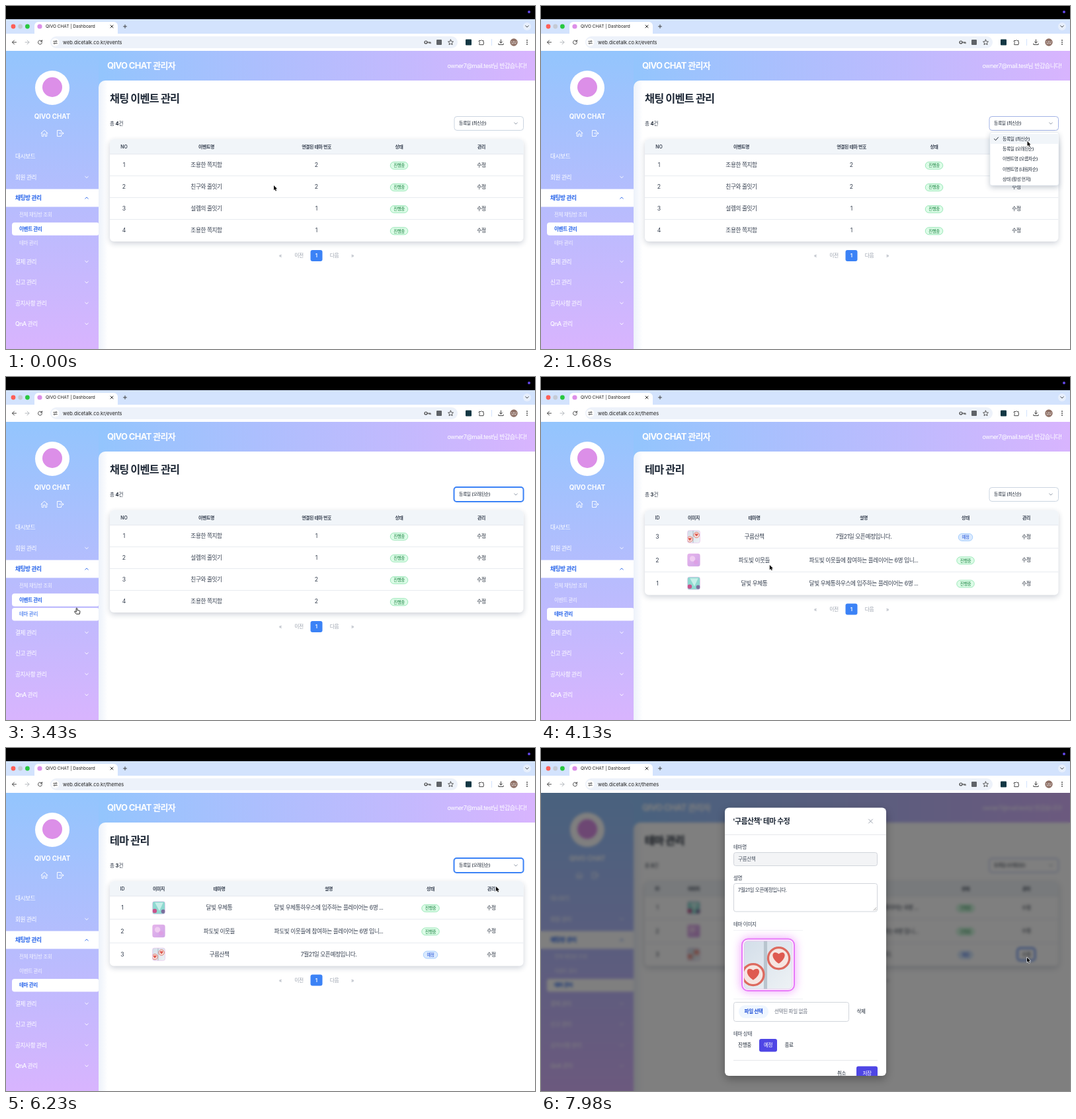
These frames come from a looping animation (800 by 520 pixels, 8 s). An HTML page with a canvas:

```html
<!DOCTYPE html>
<html lang="ko">
<head>
<meta charset="utf-8">
<title>Dashboard</title>
<style>
html, body { margin: 0; width: 100%; height: 100%; overflow: hidden; background: #fff; }
canvas { display: block; }
</style>
</head>
<body>
<canvas id="stage" width="800" height="520"></canvas>
<script>
const canvas = document.getElementById('stage');
const ctx = canvas.getContext('2d');
const LOOP = 8000;
const FONT = 'Inter, "Noto Sans CJK KR", "Noto Sans CJK", "Noto Sans", sans-serif';
const BRAND = 'QIVO CHAT';
const INK = '#1f2937', BODY = '#374151', BLUE = '#2563eb', GRAY = '#9ca3af';

const TIMES = { open1: 1400, sort1: 2100, page: 3640, open2: 5110, sort2: 6020, edit: 7630, modal: 7980 };

// Pointer path: time, x, y of the tip
const PATH = [
  [0, 405, 272], [300, 405, 272], [1260, 735, 178], [1430, 735, 178], [1680, 735.5, 205],
  [1940, 736, 214], [2170, 736, 214], [3220, 107, 350.5], [3780, 107, 350.5], [4620, 739, 177],
  [5460, 739, 177], [5810, 741, 210], [6720, 741, 210], [7000, 739, 226], [7140, 739, 226],
  [7560, 735, 317.5], [8000, 735, 317.5]
];

const EVENTS = [['조용한 쪽지함', 2], ['친구와 줄잇기', 2], ['설렘의 줄잇기', 1], ['조용한 쪽지함', 1]];
const THEMES = [
  { id: 3, name: '구름산책', note: '7월21일 오픈예정입니다.', art: signArt, live: false },
  { id: 2, name: '파도빛 이웃들', note: '파도빛 이웃들에 참여하는 플레이어는 6명 입니...', art: pinkArt, live: true },
  { id: 1, name: '달빛 우체통', note: '달빛 우체통하우스에 입주하는 플레이어는 6명 ...', art: mintArt, live: true }
];

function pointerAt(t) {
  let i = 1;
  while (t > PATH[i][0]) i++;
  const [t0, x0, y0] = PATH[i - 1], [t1, x1, y1] = PATH[i];
  const u = (t - t0) / (t1 - t0), k = u * u * (3 - 2 * u);
  return { x: x0 + (x1 - x0) * k, y: y0 + (y1 - y0) * k };
}

function text(s, x, y, size, color = BODY, weight = 400, align = 'left') {
  s = String(s);
  ctx.font = `${weight} ${size}px ${FONT}`;
  ctx.letterSpacing = /[가-힣]/.test(s) ? `${-0.05 * size}px` : '0px';
  ctx.textAlign = align;
  ctx.fillStyle = color;
  ctx.fillText(s, x, y + size * 0.36);
}
const centered = (s, x, y, size, color, weight) => text(s, x, y, size, color, weight, 'center');

function box(x, y, w, h, r, fill, stroke, lw = 1) {
  ctx.beginPath();
  ctx.roundRect(x, y, w, h, r);
  if (fill) { ctx.fillStyle = fill; ctx.fill(); }
  if (stroke) { ctx.strokeStyle = stroke; ctx.lineWidth = lw; ctx.stroke(); }
}

function shadowed(color, blur, dy, draw) {
  ctx.save();
  ctx.shadowColor = color;
  ctx.shadowBlur = blur;
  ctx.shadowOffsetY = dy;
  draw();
  ctx.restore();
}

function disc(x, y, r, fill, stroke, lw = 1) {
  ctx.beginPath();
  ctx.arc(x, y, r, 0, Math.PI * 2);
  if (fill) { ctx.fillStyle = fill; ctx.fill(); }
  if (stroke) { ctx.strokeStyle = stroke; ctx.lineWidth = lw; ctx.stroke(); }
}

function path(d, x, y, stroke, lw = 1, fill) {
  const p = new Path2D(d);
  ctx.save();
  ctx.translate(x, y);
  ctx.lineCap = ctx.lineJoin = 'round';
  if (fill) { ctx.fillStyle = fill; ctx.fill(p); }
  if (stroke) { ctx.strokeStyle = stroke; ctx.lineWidth = lw; ctx.stroke(p); }
  ctx.restore();
}

function line(x0, x1, y, color) {
  ctx.fillStyle = color;
  ctx.fillRect(x0, y, x1 - x0, 1);
}

function gradient(x0, y0, x1, y1, ...colors) {
  const g = ctx.createLinearGradient(x0, y0, x1, y1);
  colors.forEach((c, i) => g.addColorStop(i / (colors.length - 1), c));
  return g;
}

const chevron = (x, y, color, up = 1) => path(`M-2.3 ${-1.1 * up}L0 ${1.1 * up}L2.3 ${-1.1 * up}`, x, y, color, 0.9);

function drawBrowser(route) {
  ctx.fillStyle = '#000';
  ctx.fillRect(0, 0, 800, 20);
  disc(791, 9, 2, '#6247e8');
  ctx.fillStyle = '#d3e3fd';
  ctx.fillRect(0, 20, 800, 22);
  ctx.fillStyle = '#fff';
  ctx.fillRect(0, 42, 800, 26);
  disc(11, 31, 3.4, '#ff5f57');
  disc(21.7, 31, 3.4, '#c5cad4');
  disc(32.4, 31, 3.4, '#28c840');
  box(43, 24, 126, 20, [6, 6, 0, 0], '#fff');
  disc(51, 31, 3.6, '#dc8fe8');
  text(BRAND + ' | Dashboard', 60, 31, 6.5, '#1f1f1f');
  path('M-2 -2L2 2M2 -2L-2 2', 160, 31, '#333', 1);
  path('M-2.5 0H2.5M0 -2.5V2.5', 180, 31, '#333', 0.9);
  disc(788, 31, 6, '#e7effd');
  chevron(788, 31, '#333');

  path('M3 0H-3M0 -3L-3 0L0 3', 12.5, 55, '#444', 1);
  path('M-3 0H3M0 -3L3 0L0 3', 32, 55, '#b4b8bd', 1);
  path('M2.4 -1.8A3 3 0 1 0 3 .6M3 -3.2V-1H.8', 51.5, 55, '#444', 1);
  box(67, 46, 616, 18, 9, '#edf2fa');
  disc(74.5, 55, 6, '#fff');
  path('M-2.8 -1.5H.4M2.8 1.5H-.4', 74.5, 55, '#444', 0.9);
  disc(76, 53.5, 1, null, '#444', 0.8);
  disc(73, 56.5, 1, null, '#444', 0.8);
  text('web.dicetalk.co.kr/' + route, 86, 55, 7.4, '#1f1f1f');

  disc(635, 55, 2, null, '#444', 1.2);
  path('M2 0H7V1.7M5 0V1.5', 635, 55, '#444', 1.1);
  box(651, 51, 8, 8, 1, '#5f6368');
  path('M0 -4L1.2 -1.3L4 -1L1.9 .9L2.5 3.7L0 2.2L-2.5 3.7L-1.9 .9L-4 -1L-1.2 -1.3Z', 672.5, 55, '#444', 0.9);
  box(695, 50.5, 9, 9, 1, '#123743');
  path('M-3.2 -2.5H-1A1.2 1.2 0 0 1 1.2 -2.5H3V0A1.2 1.2 0 0 1 3 2V3.7H-3.2V1.8A1.2 1.2 0 0 0 -3.2 -.4Z', 719, 55, '#444', 1);
  ctx.fillStyle = '#d3e3fd';
  ctx.fillRect(734, 50, 1, 10);
  path('M0 -4V1M-2.2 -1L0 1.2L2.2 -1M-3.6 2V3.6H3.6V2', 748.5, 55, '#444', 1);
  disc(768, 55, 5.7, '#8d6e63');
  centered('담당', 768, 55, 4.5, '#fff');
  [-3, 0, 3].forEach(dy => disc(788, 55 + dy, 0.9, '#444'));
}

function drawFrame() {
  ctx.fillStyle = gradient(140, 0, 800, 0, '#93c5fd', '#d8b4fe');
  ctx.fillRect(139, 68, 661, 60);
  ctx.fillStyle = gradient(0, 68, 0, 520, '#93c5fd', '#d8b4fe');
  ctx.fillRect(0, 68, 140, 452);
  text(BRAND + ' 관리자', 153, 90.5, 13, '#fff', 700);
  text('owner7@mail.test님 반갑습니다!', 787.5, 90.5, 9, '#fff', 400, 'right');
  box(140, 113, 670, 420, [10, 0, 0, 0], gradient(140, 0, 154, 0, '#edf2fa', '#fff'));
}

function drawSidebar(route, pointer) {
  disc(70, 124, 26, '#fff');
  disc(70, 123, 15, '#dc8fe8');
  centered(BRAND, 70, 167, 9.8, '#fff', 700);
  path('M-5 0L0 -4.7L5 0M-3.7 -1V4.6H-1.3V1H1.3V4.6H3.7V-1', 58, 193, '#fff', 0.9);
  path('M1.5 -2V-4.5H-4.5V4.5H1.5V2M-1.5 0H5M3 -2L5 0L3 2', 82, 193, '#fff', 0.9);

  const items = [['대시보드', 228], ['회원 관리', 259.5], ['채팅방 관리', 291], ['결제 관리', 387.5],
    ['신고 관리', 419], ['공지사항 관리', 450.5], ['QnA 관리', 482]];
  items.forEach(([label, y], i) => {
    const active = i === 2;
    if (active) box(0, 277.5, 140, 27, 0, '#fff');
    text(label, 14, y, 8.7, active ? BLUE : '#fff', active ? 600 : 500);
    if (i) chevron(122, y, active ? BLUE : '#fff', active ? -1 : 1);
  });

  const subs = [['전체 채팅방 조회', 316.5, ''], ['이벤트 관리', 338, 'events'], ['테마 관리', 359.7, 'themes']];
  for (const [label, y, target] of subs) {
    const active = target === route;
    const hovered = pointer.x > 9 && pointer.x < 140 && Math.abs(pointer.y - y) < 9.8;
    if (active || hovered) box(9, y - 9.8, 131, 19.6, [4, 2, 2, 4], '#fff');
    text(label, 20, y, 7.6, active || hovered ? BLUE : 'rgba(255,255,255,.8)', active ? 700 : 500);
  }
}

function badge(x, y, live) {
  const w = live ? 26.5 : 21.5;
  box(x - w / 2, y - 5.2, w, 11, 5.5, live ? '#dcfce7' : '#dbeafe', live ? '#8be3ac' : '#93c5fd', 0.8);
  centered(live ? '진행중' : '예정', x, y + 0.4, 6.4, live ? '#15803d' : '#1d4ed8', 500);
}

function drawTable(headers, rows, pitch, drawRow) {
  const bottom = 224.5 + rows.length * pitch;
  shadowed('rgba(30,50,80,.22)', 9, 3, () => box(157, 202, 625.5, bottom - 202, 6, '#fff'));
  box(157, 202, 625.5, 22.5, [6, 6, 0, 0], '#f1f5f9');
  line(157, 782.5, 224, '#e5e9ef');
  headers.forEach(([label, x]) => centered(label, x, 213.3, 6.9, BODY, 600));
  rows.forEach((row, i) => {
    if (i) line(157, 782.5, Math.round(224 + i * pitch), '#e8ebf0');
    drawRow(row, 224.5 + (i + 0.5) * pitch, i);
  });
  const y = bottom + 21.5;
  centered('«', 415, y, 8, GRAY);
  centered('이전', 443, y, 7.8, GRAY);
  box(460.5, y - 8.5, 18, 17, 3, '#3b82f6');
  centered(1, 469.5, y, 7.8, '#fff', 600);
  centered('다음', 496.5, y, 7.8, GRAY);
  centered('»', 524, y, 8, GRAY);
}

function drawHeading(title, count) {
  text(title, 157, 140, 16.3, INK, 700);
  text('총', 157, 178, 7.6);
  text(count, 165.6, 178, 7.6, INK, 700);
  text('건', 170.6, 178, 7.6);
}

function drawEvents(sorted) {
  drawHeading('채팅 이벤트 관리', 4);
  const rows = sorted ? [...EVENTS].reverse() : EVENTS;
  const headers = [['NO', 178.5], ['이벤트명', 303], ['연결된 테마 번호', 469.5], ['상태', 594.5], ['관리', 719]];
  drawTable(headers, rows, 33.1, ([name, theme], y, i) => {
    centered(i + 1, 178.5, y, 8.7);
    centered(name, 303, y, 8.7);
    centered(theme, 469.5, y, 8.7);
    badge(594.5, y + 0.5, true);
    centered('수정', 719, y, 7.7, INK, 500);
  });
}

function drawThemes(sorted, editing) {
  drawHeading('테마 관리', 3);
  const rows = sorted ? [...THEMES].reverse() : THEMES;
  const headers = [['ID', 176], ['이미지', 231], ['테마명', 322.5], ['설명', 488], ['상태', 642], ['관리', 734]];
  drawTable(headers, rows, 35.3, (row, y, i) => {
    centered(row.id, 176, y, 8.7);
    thumbnail(row.art, 221.5, y - 9.5, 19, 3);
    centered(row.name, 322.5, y, 8.7);
    centered(row.note, 488, y, 8.7);
    badge(642, y + 0.5, row.live);
    if (editing && i === 2) box(720.5, y - 9.3, 26.5, 18.6, 4, '#fff', BLUE, 1.7);
    centered('수정', 734, y, 7.7, INK, 500);
  });
}

// Artwork is painted in a unit square
function thumbnail(art, x, y, size, r) {
  ctx.save();
  box(x, y, size, size, r);
  ctx.clip();
  ctx.translate(x, y);
  ctx.scale(size, size);
  art();
  ctx.restore();
  box(x, y, size, size, r, null, 'rgba(220,160,225,.55)', 0.8);
}

function fillArt(color) {
  ctx.fillStyle = color;
  ctx.fillRect(0, 0, 1, 1);
}

function signArt() {
  fillArt(gradient(0, 0, 1, 1, '#d3dee9', '#eef2f5'));
  ctx.fillStyle = '#b9c5cf';
  ctx.fillRect(0.41, 0, 0.07, 1);
  const heart = 'M0 .13C-.2 0 -.13 -.17 0 -.07C.13 -.17 .2 0 0 .13Z';
  for (const [x, y] of [[0.19, 0.7], [0.72, 0.36]]) {
    disc(x, y, 0.22, '#f6e5e1', '#dd6a5f', 0.045);
    path(heart, x, y - 0.02, null, 0, '#df5a50');
  }
}

function pinkArt() {
  fillArt(gradient(0, 0, 1, 1, '#e6b5ec', '#cfa5e8'));
  disc(0.4, 0.4, 0.22, '#f0cdf2');
  disc(0.68, 0.68, 0.18, '#dda0e4');
}

function mintArt() {
  fillArt('#8ed9d0');
  path('M.2 .1H.85L.55 .75Z', 0, 0, null, 0, '#c7efe9');
  disc(0.18, 0.76, 0.17, '#c8548c');
  disc(0.85, 0.8, 0.16, '#7b6f9d');
}

function drawSelect({ open, focused, lit, sorted, pointer, route }) {
  const label = sorted ? '등록일 (오래된순)' : '등록일 (최신순)';
  if (focused) box(677.5, 167, 105, 22, 4, '#fff', '#3b82f6', 2);
  else box(678, 167.5, 104.5, 21, 4, '#fff', lit ? '#a3b3e6' : '#cbd5e1', 1);
  text(label, 685, 178, 6.8, INK, 500);
  chevron(771, 178, '#8791a0');
  if (!open) return;
  const name = route === 'events' ? '이벤트명' : '테마명';
  const options = ['등록일 (최신순)', '등록일 (오래된순)', name + ' (오름차순)', name + ' (내림차순)', '상태 (활성 먼저)'];
  shadowed('rgba(30,50,80,.28)', 8, 3, () => box(679, 191.5, 104, 80.5, 3, '#fff'));
  box(679, 191.5, 104, 80.5, 3, null, '#e2e8f0', 0.7);
  const current = pointer.y < 194 ? 0 : Math.floor((pointer.y - 194) / 15.2);
  options.forEach((option, i) => {
    const y = 201.5 + i * 15.2;
    if (i === current) box(680, y - 7.6, 102, 15.2, 0, '#f1f5f9');
    if (i === 0) path('M-3 0L-1 2.2L3 -2.4', 688.5, y, INK, 1);
    text(option, 698, y, 6.8, INK, 500);
  });
}

function drawModal() {
  ctx.save();
  ctx.beginPath();
  ctx.rect(0, 68, 800, 452);
  ctx.clip();
  ctx.filter = 'blur(2.2px)';
  ctx.drawImage(canvas, 0, 68, 800, 452, 0, 68, 800, 452);
  ctx.filter = 'none';
  ctx.fillStyle = 'rgba(0,0,0,.5)';
  ctx.fillRect(0, 68, 800, 452);
  ctx.restore();

  shadowed('rgba(0,0,0,.3)', 14, 5, () => box(278, 90.5, 244, 406.5, 6, '#fff'));
  ctx.save();
  box(278, 90.5, 244, 406.5, 6);
  ctx.clip();
  const theme = THEMES[0], border = '#d1d5db';
  text(`'${theme.name}' 테마 수정`, 290, 111, 10.9, INK, 600);
  path('M-3 -3L3 3M3 -3L-3 3', 498.5, 111, GRAY, 1);
  line(278, 522, 131, '#e5e7eb');

  [['테마명', 150.5], ['설명', 197.5], ['테마 이미지', 267], ['테마 상태', 433]]
    .forEach(([label, y]) => text(label, 291, y, 7.6, BODY, 500));
  box(291.5, 158.5, 217, 20, 3, '#f3f4f6', border);
  text(theme.name, 298, 168.5, 7.6, '#4b5563');
  box(291.5, 205.5, 217, 42.5, 3, '#fff', border);
  text(theme.note, 298, 215.5, 7.6, BODY);
  path('M0 0L4 -4M2.5 0L4 -1.5', 503, 246, '#888', 0.7);

  line(291, 396, 276, '#f1f2f5');
  line(291, 396, 380, '#f1f2f5');
  shadowed('rgba(232,121,249,.65)', 14, 0, () => box(304, 289.5, 79, 78.5, 9, '#fff', '#e879f9', 2));
  thumbnail(theme.art, 307, 292.5, 73, 6);

  box(291.5, 385.5, 174, 29, 3, '#fff', border);
  box(299, 390, 45, 19.5, 9.7, '#eff6ff');
  centered('파일 선택', 321.5, 399.7, 7.6, '#1d4ed8', 600);
  text('선택된 파일 없음', 353, 399.7, 7.6, '#6b7280');
  centered('삭제', 484, 399.7, 7.6, INK, 500);

  centered('진행중', 308, 450.5, 7.6, INK, 500);
  box(330, 441, 27, 19.5, 3, '#4f46e5');
  centered('예정', 343.5, 450.5, 7.6, '#fff', 500);
  centered('종료', 375, 450.5, 7.6, INK, 500);
  line(291, 509, 473, '#e5e7eb');
  centered('취소', 454.5, 493, 7.6, INK, 500);
  box(477, 482.5, 32, 20, 3, '#4f46e5');
  centered('저장', 493, 493, 7.6, '#fff', 500);
  ctx.restore();
}

function drawPointer({ x, y }, hand) {
  if (hand) {
    path('M-1 .7C-1 -.7 .7 -.7 .7 .7V3L3.8 3.6Q5 3.9 4.9 5.2L4.3 8.8H-.6L-3.3 5.7C-3.8 4.8 -2.8 4.1 -2 4.7L-1 5.6Z',
      x, y, '#111', 0.9, '#fff');
  } else {
    path('M0 0V7.3L1.7 5.8L2.8 8.4L4 7.9L2.9 5.3H5.1Z', x, y, '#fff', 1.2, '#000');
    path('M0 0V7.3L1.7 5.8L2.8 8.4L4 7.9L2.9 5.3H5.1Z', x, y, null, 0, '#000');
  }
}

function render(t) {
  const pointer = pointerAt(t);
  const between = (a, b) => t >= a && t < b;
  const route = t < TIMES.page ? 'events' : 'themes';
  const open = between(TIMES.open1, TIMES.sort1) || between(TIMES.open2, TIMES.sort2);
  const focused = between(TIMES.sort1, TIMES.page) || between(TIMES.sort2, TIMES.edit);
  const sorted = focused || t >= TIMES.edit;
  const modal = t >= TIMES.modal;
  const over = (x, y, w, h) => pointer.x >= x && pointer.x < x + w && pointer.y >= y && pointer.y < y + h;
  const overSelect = !open && over(678, 167, 105, 22);
  const overEdit = route === 'themes' && over(720, 303, 28, 20);
  const overMenu = over(0, 216, 140, 280);

  drawBrowser(route);
  drawFrame();
  drawSidebar(route, pointer);
  if (route === 'events') drawEvents(sorted);
  else drawThemes(sorted, t >= TIMES.edit);
  drawSelect({ open, focused, lit: open || overSelect || t >= TIMES.edit, sorted, pointer, route });
  if (modal) drawModal();
  drawPointer(pointer, !modal && (overSelect || overEdit || overMenu));
}

function tick() {
  render(performance.now() % LOOP);
  requestAnimationFrame(tick);
}
tick();
</script>
</body>
</html>
```
